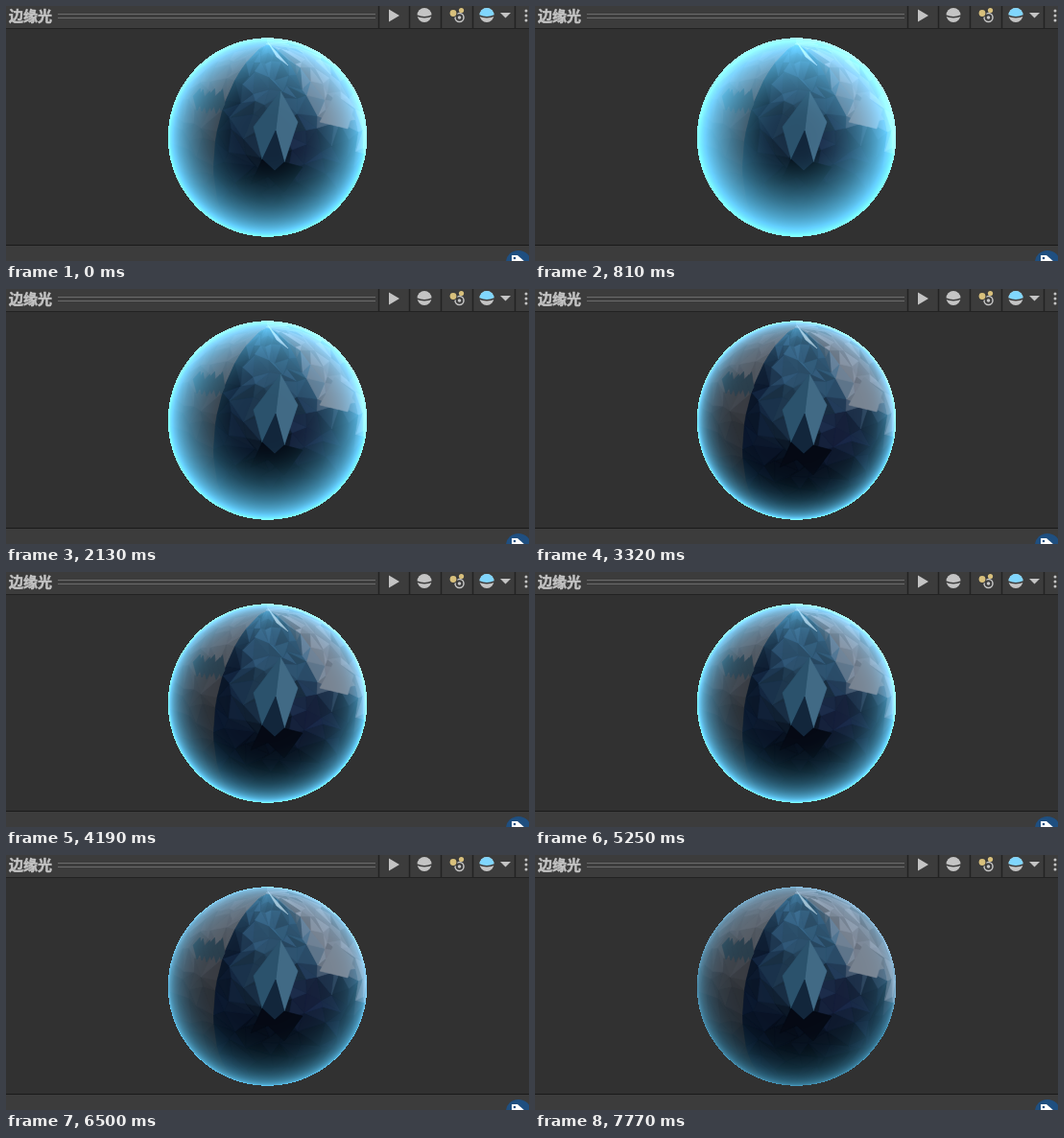
Recreate the animation shown at these times as an HTML page with a canvas. Size 545 by 266 pixels, loop 8000 ms.

```html
<!DOCTYPE html>
<html lang="zh">
<head>
<meta charset="utf-8">
<title>边缘光</title>
<style>
html, body { margin: 0; width: 100%; height: 100%; overflow: hidden; background: #313131; }
svg, canvas { position: absolute; display: block; }
svg { left: 0; top: 0; }
canvas { left: 168px; top: 32px; }
text {
  font: bold 15px "Noto Sans CJK SC", "Noto Sans CJK", sans-serif;
  fill: #c4c4c4; stroke: #c4c4c4; stroke-width: 0.5px;
}
</style>
</head>
<body>
<svg width="545" height="266" viewBox="0 0 545 266">
  <rect width="545" height="266" fill="#313131"/>
  <rect width="545" height="23" fill="#3c3c3c"/>
  <rect y="23" width="545" height="1" fill="#222"/>
  <rect y="249" width="545" height="17" fill="#3c3c3c"/>
  <rect y="249" width="545" height="1" fill="#1a1a1a"/>
  <text x="3" y="16">边缘光</text>
  <path d="M54 8.5H385M54 12.5H385" stroke="#6c6c6c"/>
  <path d="M388.5 0V23M420.5 0V23M453.5 0V23M486.5 0V23M530.5 0V23" stroke="#232323" stroke-width="1.5"/>
  <g fill="#c4c4c4">
    <path d="M399 3.500L410 10L399 16.500Z"/>
    <circle cx="436" cy="9.500" r="7.500"/>
    <circle cx="501" cy="9.500" r="7.500"/>
    <path d="M515 7H526L520.500 12.500Z"/>
    <circle cx="542" cy="5" r="1.500"/><circle cx="542" cy="10" r="1.500"/><circle cx="542" cy="15" r="1.500"/>
  </g>
  <path d="M493.500 9.500A7.500 7.500 0 0 1 508.500 9.500Q501 13 493.500 9.500Z" fill="#80d6fd"/>
  <path d="M428 10Q436 13.500 444 10M493 10Q501 13.500 509 10" fill="none" stroke="#3c3c3c" stroke-width="1.500"/>
  <circle cx="472.500" cy="12" r="4.500" fill="none" stroke="#c4c4c4" stroke-width="1.500"/>
  <circle cx="472.500" cy="12" r="1.800" fill="#c4c4c4"/>
  <circle cx="466" cy="7.500" r="4.500" fill="#3c3c3c"/>
  <circle cx="466" cy="7.500" r="3.400" fill="#d8c07c"/>
  <circle cx="474.500" cy="4.500" r="2.600" fill="#d8c07c"/>
  <ellipse cx="534" cy="267" rx="13" ry="12" fill="#1f4f80"/>
  <path d="M527 260H533L541 267L535 273L527 266Z" fill="#fff"/>
  <circle cx="530" cy="263" r="1.300" fill="#1f4f80"/>
</svg>
<canvas id="ball" width="210" height="210"></canvas>
<script>
const SIZE = 210, LEFT = 168, TOP = 32, CX = 272.5, CY = 137, R = 103.7;
const TILT = 0.35, SEAM = -0.57, LOOP = 8000;
const COS = Math.cos(TILT), SIN = Math.sin(TILT);
const RIM = [0.24, 1.2, 1.9];   // linear light

// The few large facets that stand out in the middle
const facets = {
  "#416a85": "286,89 304,121 290,163 281,130",
  "#2b526c": "286,89 281,130 267,160 258,126",
  "#12263b": "281,130 290,163 280,175 267,160",
  "#050914": "267,160 280,172 290,163 309,168 290,194 273,178 255,186",
  "#78828f": "327,121 343,92 362,108 356,128",
  "#9fbccd": "273,38 294,62 282,53"
};

let seed = 11;
const rand = () => (seed = seed * 16807 % 2147483647) / 2147483647;
const jitter = size => (rand() - 0.5) * size;
const unit = v => Math.min(1, Math.max(0, v));
const mix = (a, b, t) => a.map((v, i) => v + (b[i] - v) * t);
const rgb = c => `rgb(${c.map(Math.round).join()})`;
const toLin = c => c <= 0.04045 ? c / 12.92 : ((c + 0.055) / 1.055) ** 2.4;
const toSrgb = c => c <= 0.0031308 ? c * 12.92 : 1.055 * c ** (1 / 2.4) - 0.055;

function project(lon, lat) {
  const s = Math.sin(lat), c = Math.cos(lat) * Math.cos(lon);
  return [CX + R * Math.cos(lat) * Math.sin(lon), CY - R * (s * COS - c * SIN), s * SIN + c * COS];
}

function lonAt(x, y) {
  const X = (x - CX) / R, Y = (CY - y) / R;
  const Z = Math.sqrt(Math.max(0, 1 - X * X - Y * Y));
  return Math.atan2(X, Z * COS - Y * SIN);
}

// Smooth rock beyond the seam
function rockTone(y) {
  const c = mix([106, 113, 124], [52, 54, 59], unit((y - 50) / 80));
  return mix(c, [18, 23, 30], unit((y - 130) / 85));
}

// Blue crystal: dark below and along the seam, pale sky to the upper right
function crystalTone(x, y, lon) {
  const near = (cx, cy, r) => Math.exp(-((x - cx) ** 2 + (y - cy) ** 2) / r ** 2);
  let c = mix([50, 90, 120], [6, 13, 25], unit((y - 80) / 95));
  c = mix(c, [8, 18, 40], 0.85 * Math.exp(-(((lon - SEAM) / 0.28) ** 2)) * unit((y - 40) / 50));
  c = mix(c, [28, 36, 74], 0.8 * near(318, 150, 24));
  c = mix(c, [24, 46, 72], 0.6 * near(348, 180, 32));
  const sky = Math.max(unit((lon - 0.55) / 0.2) * unit((132 - y) / 18), unit((lon - 1.1) / 0.15) * unit((175 - y) / 30));
  return mix(c, [124, 133, 147], sky);
}

const tone = (x, y, lon, isRock) => isRock ? rockTone(y) : crystalTone(x, y, lon);

function polygon(g, pts, color) {
  g.beginPath();
  pts.forEach(p => g.lineTo(p[0], p[1]));
  g.closePath();
  g.fillStyle = g.strokeStyle = color;
  g.fill();
  g.stroke();
}

function paintMesh(g) {
  const cols = 22, rows = 18, seamCol = 8, grid = [];
  for (let j = 0; j <= rows; j++) {
    grid.push([]);
    for (let i = 0; i <= cols; i++) {
      const lon = SEAM + 0.19 * (i - seamCol + (i === seamCol ? 0 : jitter(0.8)));
      grid[j].push(project(lon, -1.45 + 0.165 * (j + jitter(0.8))));
    }
  }
  for (let j = 0; j < rows; j++) {
    for (let i = 0; i < cols; i++) {
      const a = grid[j][i], b = grid[j][i + 1], c = grid[j + 1][i], d = grid[j + 1][i + 1];
      const isRock = i < seamCol;
      for (const tri of rand() < 0.5 ? [[a, b, c], [b, d, c]] : [[a, b, d], [a, d, c]]) {
        const gain = 1 + jitter(isRock ? 0.08 : 0.36);
        const [x, y, z] = [0, 1, 2].map(n => (tri[0][n] + tri[1][n] + tri[2][n]) / 3);
        if (z < 0.02) continue;
        polygon(g, tri, rgb(tone(x, y, lonAt(x, y), isRock).map(v => v * gain)));
      }
    }
  }
}

function paintSurface() {
  const cv = document.createElement("canvas");
  cv.width = cv.height = SIZE;
  const g = cv.getContext("2d");
  g.translate(-LEFT, -TOP);
  g.lineWidth = 0.6;

  // Soft underlayer up to the silhouette
  for (let y = TOP; y < TOP + SIZE; y += 2) {
    for (let x = LEFT; x < LEFT + SIZE; x += 2) {
      const lon = lonAt(x + 1, y + 1);
      g.fillStyle = rgb(tone(x, y, lon, lon < SEAM));
      g.fillRect(x, y, 2, 2);
    }
  }
  paintMesh(g);

  // Dark shards on the rock
  for (let x = 199; x < 226; x += 5) {
    const y = 97 + jitter(6);
    polygon(g, [[x - 4, y - 2], [x + 3 + jitter(4), y - 10], [x + 4, y + 6], [x, y + 13]], "#2a3d4a");
  }
  for (const color in facets) {
    polygon(g, facets[color].split(" ").map(p => p.split(",")), color);
  }
  return g.getImageData(0, 0, SIZE, SIZE).data;
}

const ctx = document.getElementById("ball").getContext("2d");
const image = ctx.createImageData(SIZE, SIZE);
const surface = paintSurface();
const linear = Float32Array.from({ length: 256 }, (_, i) => toLin(i / 255));
const encode = Uint8Array.from({ length: 4097 }, (_, i) => Math.round(255 * toSrgb(i / 4096)));
const pixels = [];
for (let y = 0; y < SIZE; y++) {
  for (let x = 0; x < SIZE; x++) {
    const d = Math.hypot(x + 0.5 + LEFT - CX, y + 0.5 + TOP - CY);
    if (d > R) continue;
    const at = (y * SIZE + x) * 4;
    image.data[at + 3] = 255;
    pixels.push([at, 1 - Math.sqrt(1 - (d / R) ** 2)]);
  }
}

// Fresnel rim light added to the surface
function shade(power, glow) {
  const out = image.data;
  for (const [at, facing] of pixels) {
    const f = glow * facing ** power;
    for (let c = 0; c < 3; c++) {
      const v = linear[surface[at + c]] + RIM[c] * f;
      out[at + c] = encode[Math.min(4096, v * 4096 | 0)];
    }
  }
  ctx.putImageData(image, 0, 0);
}

// Slider drags: start, last step, property, end value, time per step
const drags = [
  [330, 1090, "power", 1.15], [1160, 1360, "power", 0.85],
  [1640, 2410, "power", 2.8], [2480, 3460, "power", 4.1],
  [3790, 4330, "power", 3.2],
  [5250, 5960, "glow", 0.7], [6230, 6500, "glow", 0.5],
  [6960, 7770, "glow", 0.3, 200]
];

function stateAt(t) {
  const s = { power: 2, glow: 1.1 };
  for (const [from, to, key, end, gap = 69.5] of drags) {
    if (t < from) break;
    const steps = Math.round((to - from) / gap) + 1;
    const k = Math.min(steps, Math.floor((t - from) / gap + 0.05) + 1);
    s[key] += (end - s[key]) * k / steps;
  }
  return s;
}

let shown = "";
const start = performance.now();
function frame() {
  const { power, glow } = stateAt((performance.now() - start) % LOOP);
  const key = power + "/" + glow;
  if (key !== shown) {
    shade(power, glow);
    shown = key;
  }
  requestAnimationFrame(frame);
}
frame();
</script>
</body>
</html>
```
